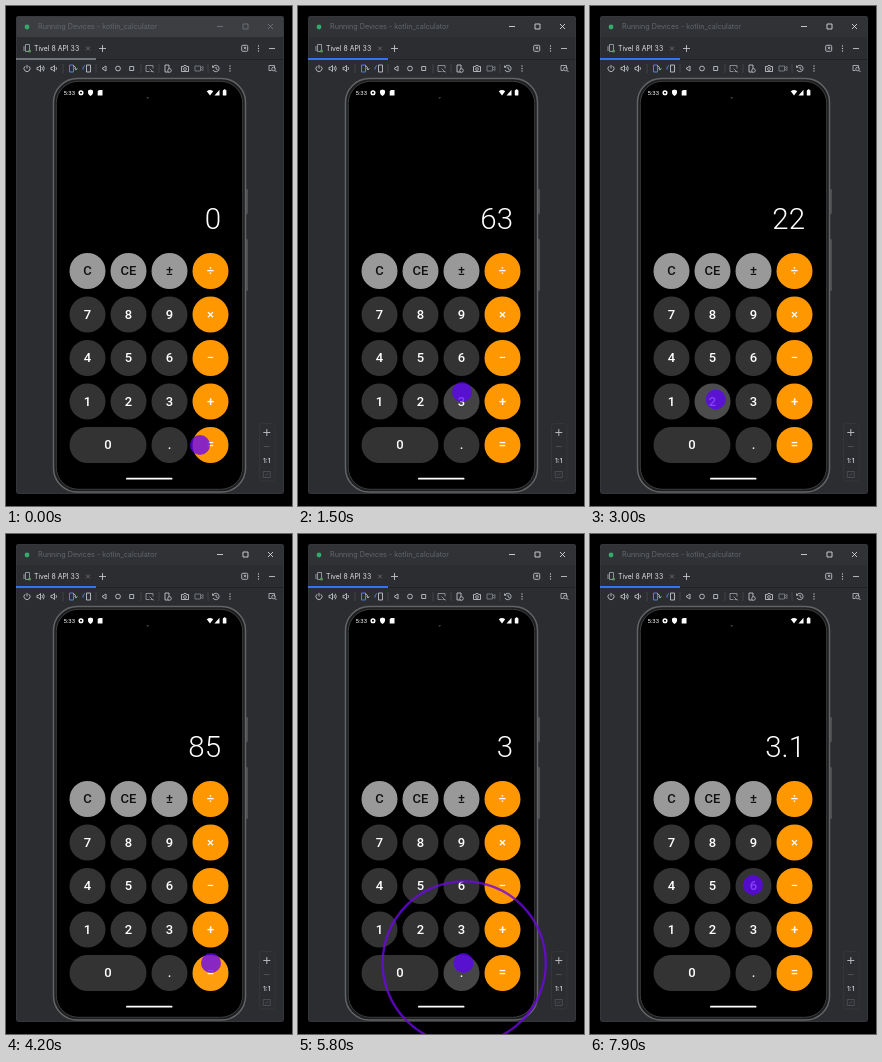
An HTML page with a canvas that plays this animation: 286 by 500 pixels, repeating every 8000 ms.

```html
<!DOCTYPE html>
<html lang="en">
<head>
<meta charset="utf-8">
<title>Calculator demo</title>
<style>
html, body { margin: 0; width: 100%; height: 100%; overflow: hidden; background: #000; }
canvas { display: block; width: 286px; height: 500px; }
</style>
</head>
<body>
<canvas id="stage"></canvas>
<script>
const W = 286, H = 500, LOOP = 8000, STEP = 100;
const canvas = document.getElementById('stage');
const ctx = canvas.getContext('2d');
const dpr = window.devicePixelRatio || 1;
canvas.width = W * dpr;
canvas.height = H * dpr;

const UI = 'Inter, sans-serif', DROID = 'Roboto, sans-serif';
const ICON = '#c0c3c9', DIM = '#6f737a';
const COLS = [81.5, 122.5, 163.5, 204.5];
const ROWS = [265, 308.5, 352, 395.5, 439];
const KEYS = ['C CE ± ÷', '7 8 9 ×', '4 5 6 −', '1 2 3 +', '0 0 . ='].map(r => r.split(' '));

// Pointer path: time, x, y
const PATH = [
  [0, 194, 439], [700, 165, 356], [1050, 165, 356], [1180, 164, 386],
  [1550, 164, 386], [1850, 195, 398], [2200, 195, 398], [2500, 125.7, 393.5],
  [3050, 125.7, 393.5], [3500, 202, 428], [3600, 205, 429], [4200, 205, 429],
  [4450, 179.5, 402], [4700, 179.5, 402], [5100, 167, 411], [5300, 167, 411],
  [5600, 165.5, 429], [6000, 165.5, 429], [6300, 88, 395], [6600, 88, 395],
  [7000, 210.5, 317], [7400, 210.5, 317], [7900, 163, 351]
];
// Presses: time, key, reading shown after it
const PRESSES = [
  [880, '6', '6'], [1180, '3', '63'], [1880, '+', '63'], [2560, '2', '2'],
  [2730, '2', '22'], [3840, '=', '85'], [4480, '3', '3'], [5680, '.', '3.'],
  [6343, '1', '3.1'], [7143, '×', '3.1']
];
const RING_SPEED = 0.68, RING_MAX = 178, INPUT_DELAY = 150, FOCUS_AT = 900;

function box(x, y, w, h, r, fill, stroke, lw = 1) {
  ctx.beginPath();
  ctx.roundRect(x, y, w, h, r);
  if (fill) { ctx.fillStyle = fill; ctx.fill(); }
  if (stroke) { ctx.strokeStyle = stroke; ctx.lineWidth = lw; ctx.stroke(); }
}

function disc(x, y, r, fill, stroke, lw = 1) {
  ctx.beginPath();
  ctx.arc(x, y, r, 0, Math.PI * 2);
  if (fill) { ctx.fillStyle = fill; ctx.fill(); }
  if (stroke) { ctx.strokeStyle = stroke; ctx.lineWidth = lw; ctx.stroke(); }
}

function icon(path, x, y, color = ICON, lw = 0.9) {
  ctx.save();
  ctx.translate(x, y);
  ctx.strokeStyle = color;
  ctx.lineWidth = lw;
  ctx.stroke(new Path2D(path));
  ctx.restore();
}

function text(str, x, y, font, color, align = 'left') {
  ctx.font = font;
  ctx.fillStyle = color;
  ctx.textAlign = align;
  ctx.fillText(str, x, y);
}

function dots(x, y, color = ICON) {
  for (const d of [-2.5, 0, 2.5]) disc(x, y + d, 0.65, color);
}

const CROSS = 'M-2.5-2.5L2.5 2.5M2.5-2.5L-2.5 2.5';
const PLUS = 'M-3.5 0H3.5M0-3.5V3.5';
const DASH = 'M-3 0H3';
const SQUARE = 'M-2.5-2.5H2.5V2.5H-2.5Z';
const PHONE = 'M-2-3.5H2V3.5H-2Z';
const SPEAKER = 'M-3.5-1.2H-2L0-3V3L-2 1.2H-3.5Z';
const FRAME = 'M-3.5-3H3.5V3H-3.5Z';

function drawWindow(focused) {
  const bar = focused ? '#303236' : '#3c3e42';
  box(10, 10, 268, 478, 3, '#2b2d30');
  box(10, 10, 268, 21, [3, 3, 0, 0], bar);
  box(10, 53.2, 268, 0.8, 0, '#1e1f22');
  box(10.5, 10.5, 267, 477, 3, null, '#36383c', 0.8);

  disc(21, 21, 2.4, '#35a86b');
  text('Running Devices - kotlin_calculator', 32, 23.3, '7.2px ' + UI, '#63676d');
  const control = focused ? '#d5d7dc' : DIM;
  icon(DASH, 214, 20.5, control);
  icon(SQUARE, 239.5, 20.5, control);
  icon(CROSS, 264.5, 20.5, control);

  icon(PHONE + 'M-3.5-2V3', 21.5, 42, '#9aa0aa');
  disc(23.5, 45, 1.5, '#57965c');
  text('Tivel 8 API 33', 28, 45, '6.9px ' + UI, '#dfe1e5');
  icon('M-1.8-1.8L1.8 1.8M1.8-1.8L-1.8 1.8', 82, 42.5, '#73777e', 0.8);
  icon(PLUS, 96.5, 42.5);
  box(10, 52, 80, 2, 0, focused ? '#3574f0' : DIM);
  box(235.7, 39.3, 6, 6, 1, null, ICON, 0.9);
  icon('M-1 1L1-1M-1-1H1V1', 238.7, 42.3, ICON, 0.8);
  dots(252.5, 42.5);
  icon(DASH, 266, 42.5);
}

function drawToolbar() {
  const y = 62.5;
  icon('M0-3.6V0M-1.8-2.3A3 3 0 1 0 1.8-2.3', 21, y);
  icon(SPEAKER + 'M1.5-1.5Q2.5 0 1.5 1.5M2.8-2.8Q4.7 0 2.8 2.8', 34.5, y);
  icon(SPEAKER + 'M1.5-1.5Q2.5 0 1.5 1.5', 48.5, y);
  icon(PHONE, 65.5, y, '#548af7');
  icon('M0-3Q3-2 3 1M1.5 0L3 1.5L4.3 0', 67, y, ICON, 0.8);
  icon(PHONE, 82.5, y, ICON);
  icon('M-1-3Q-3.5-2-3 1', 80, y, '#548af7');
  icon('M2-2.5L-2 0L2 2.5Z', 98, y);
  disc(112, y, 2.4, null, ICON, 0.9);
  icon('M-2-2H2V2H-2Z', 125.7, y);
  icon('M0 3H-3.5V-3H3.5V0M0 0L4 4M1 3H4', 143.5, y, '#9da0a8', 0.8);
  icon(PHONE, 161, y);
  disc(163.5, 64.5, 1.8, '#2b2d30', ICON, 0.8);
  icon('M-3.5-2H-1.5L-1-3H1L1.5-2H3.5V3H-3.5Z', 179, y);
  disc(179, 63, 1.4, null, ICON, 0.8);
  icon('M-4-2.5H1.5V2.5H-4ZM1.5-.5L4-2V2L1.5.5', 193, y, '#85888f', 0.8);
  icon('M-3-1.5A3.2 3.2 0 1 1-3 1.5M-3.5-3V-1.2H-1.7M0-1.7V.3L1.5 1', 210, y);
  dots(224, y);
  icon('M-3.5-3H2V0M-3.5-3V2H-1', 266.5, y, ICON, 0.8);
  disc(267.5, 63, 1.8, null, ICON, 0.8);
  icon('M1.3 1.3L3 3', 267.5, 63);
  for (const x of [57, 90, 135, 153, 202]) box(x - 0.4, 58, 0.8, 9, 0, '#46494e');
}

function drawZoom() {
  box(253.5, 417.5, 15.5, 57.5, 3, '#2b2d30', '#36383c', 0.8);
  icon(PLUS, 260.8, 426.5);
  icon(DASH, 260.8, 440.5, '#505359');
  text('1:1', 260.8, 456.5, '600 6.5px ' + UI, ICON, 'center');
  icon(FRAME + 'M-1.5 1L1.5-1', 260.8, 468.5, '#505359', 0.8);
}

function drawPhone() {
  box(239.5, 183, 2.5, 25, 1, '#4c4e50');
  box(239.5, 233, 2.5, 52, 1, '#4c4e50');
  box(47.5, 72.5, 192, 413.5, 24, '#1d1e1f', '#626465', 1.5);
  box(50.3, 75.3, 186.4, 408, 22, '#000', '#3c3d3e', 1);
  icon('M-1 1L1-1M-1.5-.5H0', 142, 92, '#3b4144', 0.8);

  text('5:33', 57.5, 89, '6px ' + DROID, '#fff');
  disc(75, 86.8, 1.8, null, '#fff', 1.5);
  ctx.fillStyle = '#fff';
  ctx.fill(new Path2D('M84.5 83.5L87 84.5V87Q86.5 89 84.5 90Q82.5 89 82 87V84.5Z'));
  ctx.fill(new Path2D('M93 84H96.5V89.5H91.7V85.3Z'));
  ctx.fill(new Path2D('M200.8 85.3Q204 82.7 207.2 85.3L204 89.5Z'));
  ctx.fill(new Path2D('M213.5 83.8V89.5H208.5Z'));
  box(216.8, 84, 3.6, 5.6, 0.7, '#fff');
  box(217.8, 83.3, 1.6, 1, 0, '#fff');
  box(120, 471.8, 46.5, 1.8, 1, '#fff');
}

function drawKeys(glow) {
  ROWS.forEach((y, row) => COLS.forEach((x, col) => {
    const key = KEYS[row][col];
    if (row === 4 && col === 1) return;
    const wide = row === 4 && col === 0;
    const w = wide ? 77 : 36;
    const light = row === 0 && col < 3;
    const fill = col === 3 ? '#ff9800' : light ? '#999' : '#333';
    box(x - 18, y - 18, w, 36, 18, fill);
    if (glow[key]) box(x - 18, y - 18, w, 36, 18, `rgba(255,255,255,${glow[key]})`);
    text(key, x - 18 + w / 2, Math.floor(y + 4.6), '500 13px ' + DROID, light ? '#111' : '#fff', 'center');
  }));
}

function pointerAt(t) {
  const i = PATH.findIndex(p => p[0] > t);
  if (i < 0) return PATH[PATH.length - 1].slice(1);
  const [t0, x0, y0] = PATH[i - 1], [t1, x1, y1] = PATH[i];
  const u = (t - t0) / (t1 - t0), e = u * u * (3 - 2 * u);
  return [x0 + (x1 - x0) * e, y0 + (y1 - y0) * e];
}

function render(t) {
  ctx.setTransform(dpr, 0, 0, dpr, 0, 0);
  ctx.fillStyle = '#000';
  ctx.fillRect(0, 0, W, H);

  let reading = '0';
  const glow = {};
  for (const [at, key, value] of PRESSES) {
    const age = t - at;
    if (age >= INPUT_DELAY) reading = value;
    if (age >= 0 && age < 420) glow[key] = 0.12 * Math.min(1, age / 150, (420 - age) / 150);
  }

  drawWindow(t >= FOCUS_AT);
  drawToolbar();
  drawZoom();
  drawPhone();
  text(reading, 215, 223, '300 29.5px ' + DROID, '#fff', 'right');
  drawKeys(glow);

  for (const [at] of PRESSES) {
    const r = (t - at) * RING_SPEED;
    if (r <= 0 || r > RING_MAX) continue;
    const [x, y] = pointerAt(at);
    disc(x + 0.7, y, r, null, `rgba(108,8,225,${1 - r / 400})`, 2.4);
  }
  const [x, y] = pointerAt(t);
  disc(x, y, 10, 'rgba(96,0,255,0.75)');
}

function tick(now) {
  render(Math.floor((now % LOOP) / STEP) * STEP);
  requestAnimationFrame(tick);
}
requestAnimationFrame(tick);
</script>
</body>
</html>
```
